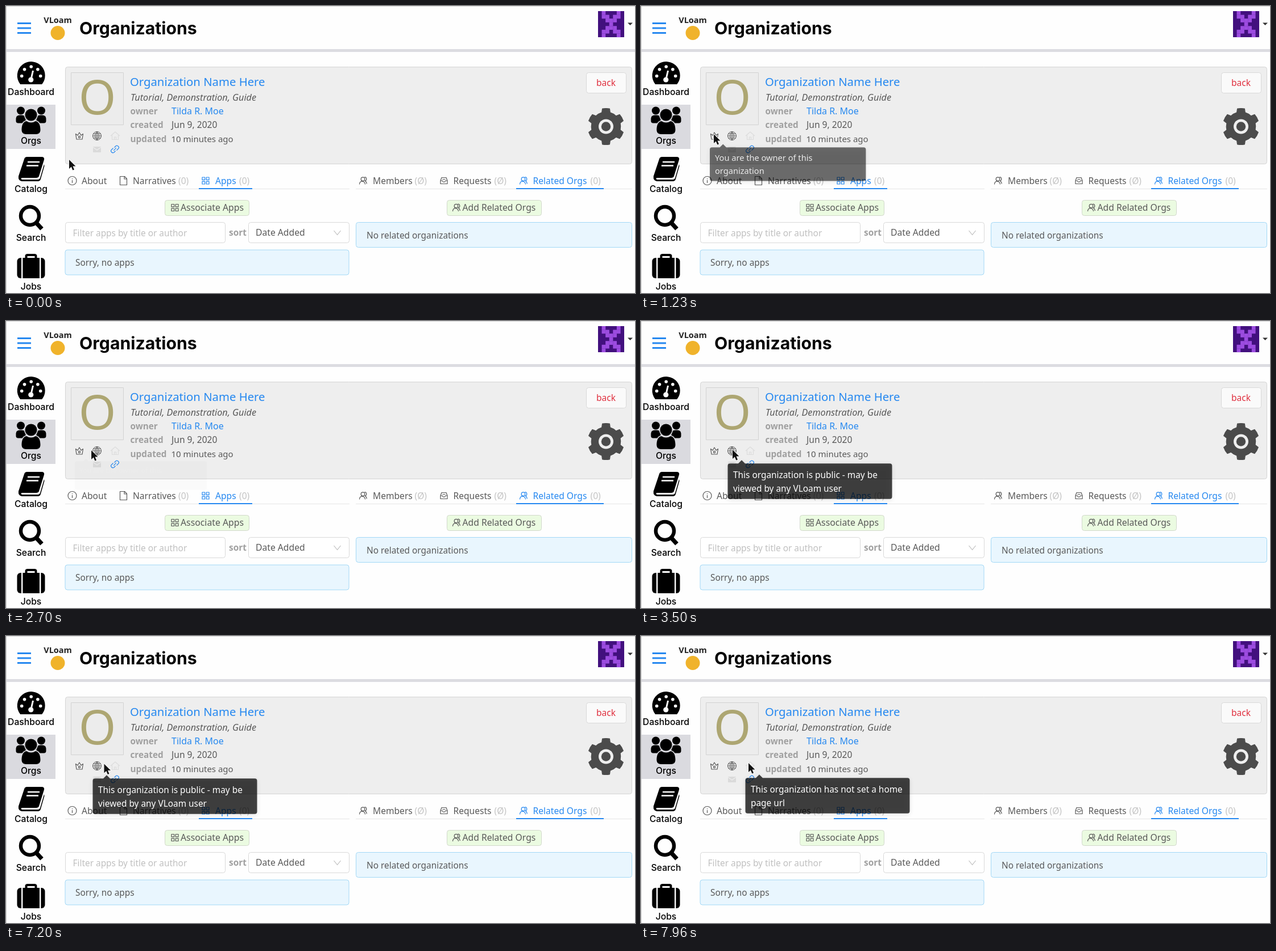
These frames come from a looping animation (1106x506 px, 8000 ms). An HTML page with a canvas:

```html
<!DOCTYPE html>
<html lang="en">
<head>
<meta charset="utf-8">
<title>Organizations</title>
<style>
html, body { margin: 0; width: 100%; height: 100%; overflow: hidden; background: #fefefe; }
canvas { display: block; }
</style>
</head>
<body>
<canvas id="stage" width="1106" height="506"></canvas>
<script>
const ctx = document.getElementById('stage').getContext('2d');
const LOOP = 8000;
const BLUE = '#2588f0', INK = '#595959', PALE = '#c4c4c4', PANEL = '#eeeeee', PAGE = '#fefefe';
const SANS = '"Noto Sans", sans-serif', UI = 'Inter, sans-serif';

function text(str, x, y, size, color = INK, style = '400', family = SANS, align = 'left') {
  ctx.font = `${style} ${size}px ${family}`;
  ctx.fillStyle = color;
  ctx.textAlign = align;
  ctx.fillText(str, x, y);
}

function rect(x, y, w, h, color) {
  ctx.fillStyle = color;
  ctx.fillRect(x, y, w, h);
}

function box(x, y, w, h, fill, border, radius = 4) {
  ctx.beginPath();
  ctx.roundRect(x + .5, y + .5, w - 1, h - 1, radius);
  ctx.fillStyle = fill;
  ctx.fill();
  ctx.strokeStyle = border;
  ctx.lineWidth = 1;
  ctx.stroke();
}

function disc(x, y, r, color) {
  ctx.beginPath();
  ctx.arc(x, y, r, 0, 7);
  ctx.fillStyle = color;
  ctx.fill();
}

function line(path, color, width = 1.2) {
  ctx.strokeStyle = color;
  ctx.lineWidth = width;
  ctx.stroke(new Path2D(path));
}

function shape(path, color) {
  ctx.fillStyle = color;
  ctx.fill(new Path2D(path));
}

function at(x, y, draw) {
  ctx.save();
  ctx.translate(x, y);
  draw();
  ctx.restore();
}

// Small outline icons, centred on the local origin
const icons = {
  info: 'M7.5 0A7.5 7.5 0 1 1 -7.5 0A7.5 7.5 0 1 1 7.5 0ZM0 -1V4M0 -4V-2.8',
  file: 'M-6 -7.5H2L6 -3.5V7.5H-6ZM1.5 -7.5V-3H6',
  apps: 'M-6 -6H-1.3V-1.3H-6ZM1.3 -6H6V-1.3H1.3ZM-6 1.3H-1.3V6H-6ZM1.3 1.3H6V6H1.3Z',
  people: 'M-3.8 -2.8A3.3 3.3 0 1 1 2.8 -2.8A3.3 3.3 0 1 1 -3.8 -2.8M-6.5 6.5C-6.2 -1 2.6 -.5 3.6 6.5' +
    'M2.5 -6.3A3.3 3.3 0 0 1 3.3 .2Q6 1.8 6.3 5.5',
  inbox: 'M-6 0L-4 -5.5H4L6 0V5.5H-6ZM-6 0H-2.5Q-2 2.5 0 2.5T2.5 0H6M-2.5 -2.5H2.5',
  crown: 'M-5 6H5L6.5 -3.5L3 -1L0 -6L-3 -1L-6.5 -3.5ZM1.6 2A1.6 1.6 0 1 1 -1.6 2A1.6 1.6 0 1 1 1.6 2',
  globe: 'M7.5 0A7.5 7.5 0 1 1 -7.5 0A7.5 7.5 0 1 1 7.5 0ZM0 -7.5V7.5M-7.5 0H7.5M-6.4 -3.8H6.4M-6.4 3.8H6.4' +
    'M0 -7.5Q-7 0 0 7.5Q7 0 0 -7.5',
  home: 'M-8 0L0 -7L8 0M-5.5 -1V6.5H5.5V-1M-1.5 6.5V2H1.5V6.5',
  link: 'M-1 -3L2 -6Q4 -7 6 -5T6 -1L3 2M1 3L-2 6Q-4 7 -6 5T-6 1L-3 -2M-2.3 2.3L2.3 -2.3',
  chevron: 'M-6 -3.5L0 4L6 -3.5'
};

function icon(name, x, y, color = INK, width = 1.2) {
  at(x, y, () => line(icons[name], color, width));
}

function header() {
  rect(0, 0, 1106, 1, '#d6d6d6');
  rect(0, 0, 1, 506, '#d0d0d0');
  rect(1, 76, 1105, 5, '#dcdce1');
  for (const y of [29, 37.5, 46]) rect(20, y, 24, 3, BLUE);
  text('VLoam', 91, 30, 14.5, '#222', '600', SANS, 'center');
  disc(91, 47.5, 12.5, '#f0b32b');
  text('Organizations', 129, 49.5, 30.2, '#050505', '700', UI);

  rect(1041, 9, 46, 46, '#42107e');
  ['0100010', '0110110', '0011100', '0001000', '0011100', '0110110', '0100010'].forEach((row, j) =>
    [...row].forEach((on, i) => on > 0 && rect(1041 + i * 46 / 7, 9 + j * 46 / 7, 6.7, 6.7, '#9c4ce0')));
  shape('M1093 29.5H1102L1097.5 34Z', '#333');
}

function dashboardIcon() {
  ctx.beginPath();
  ctx.arc(44.2, 122.5, 24.5, Math.PI - .68, .68);
  ctx.closePath();
  ctx.fillStyle = '#000';
  ctx.fill();
  for (let i = 0; i < 5; i++) {
    const a = Math.PI * (1 + i / 4);
    disc(44.2 + 16.5 * Math.cos(a), 123.5 + 16.5 * Math.sin(a), 2.8, PAGE);
  }
  disc(43.8, 130, 4.6, PAGE);
  line('M43.8 130L47.5 114', PAGE, 3);
}

function usersIcon(bg) {
  for (const side of [-1, 1]) {
    at(44 + side * 18, 0, () => {
      disc(0, 184.5, 7, '#000');
      ctx.beginPath();
      ctx.roundRect(-8.5, 192.5, 17, 14, [6, 6, 4, 4]);
      ctx.fill();
    });
  }
  const body = 'M36 203C30 204 27.5 210 27.5 219Q28 226 35 226H53Q60 226 60.5 219C60.5 210 58 204 52 203Q44 208 36 203Z';
  line(body, bg, 3);
  disc(44, 192, 12, bg);
  shape(body, '#000');
  disc(44, 192, 10.5, '#000');
}

function bookIcon() {
  shape('M37 266H64Q68 267 67 271L58 300Q57 303 53 303H28Q25 304 28 306H56Q59 306 60 303L67 279' +
    'Q68 282 67 284L61 305Q60 309 56 309H28Q21 308 22 300L32 270Q33 266 37 266Z', '#000');
  line('M38 275H59M36 281.5H57', PAGE, 2.4);
}

function suitcaseIcon() {
  ctx.beginPath();
  ctx.roundRect(19.5, 444, 49, 36, 6);
  ctx.fillStyle = '#000';
  ctx.fill();
  line('M35.5 445V441Q35.5 439 38 439H50Q52.5 439 52.5 441V445', '#000', 4);
  rect(27, 444, 2.4, 36, PAGE);
  rect(59, 444, 2.4, 36, PAGE);
}

function sidebar() {
  const selected = '#dadadf';
  rect(1, 174, 86, 78, selected);
  dashboardIcon();
  usersIcon(selected);
  bookIcon();
  line('M58 370A16 16 0 1 1 26 370A16 16 0 1 1 58 370', '#000', 6.5);
  line('M53 382L63 393', '#000', 7.5);
  suitcaseIcon();
  ['Dashboard', 'Orgs', 'Catalog', 'Search', 'Jobs'].forEach((label, i) =>
    text(label, 44, 157 + i * 85.7, 15.7, '#000', '500', UI, 'center'));
}

function gear(x, y) {
  at(x, y, () => {
    ctx.beginPath();
    for (let i = 0; i < 6; i++) {
      const a = i * Math.PI / 3 - Math.PI / 2;
      ctx.arc(0, 0, 25.7, a - .76, a - .29);
      ctx.arc(0, 0, 32, a - .2, a + .2);
    }
    ctx.closePath();
    ctx.fillStyle = ctx.strokeStyle = '#4b4b4b';
    ctx.lineWidth = 1.2;
    ctx.fill();
    ctx.stroke();
    disc(0, 0, 13, PANEL);
    disc(0, 0, 8.2, '#4b4b4b');
  });
}

function orgPanel() {
  box(104, 107, 997, 172, PANEL, '#d4d4d4');
  box(114, 117, 93, 93, '#ececec', '#d2d2d2', 0);
  text('O', 160.5, 191, 84, '#ada672', '400', SANS, 'center');

  icon('crown', 129, 229);
  icon('globe', 160, 229, INK, 1);
  icon('home', 192, 229, '#dcdcdc');
  rect(153, 248, 14, 10, '#dadada');
  line('M153 249L160 254L167 249', PANEL);
  icon('link', 191.5, 252.5, BLUE);

  text('Organization Name Here', 218, 141, 20.3, BLUE, '500');
  text('Tutorial, Demonstration, Guide', 219, 167, 16.2, INK, 'italic 400');
  ['owner', 'created', 'updated'].forEach((label, i) =>
    text(label, 218.5, 191 + i * 24.3, 15.3, '#a0a0a0', '600'));
  text('Tilda R. Moe', 291, 191, 16, BLUE);
  text('Jun 9, 2020', 291, 215.3, 15.6);
  text('10 minutes ago', 290.5, 239.6, 15);

  box(1020, 117, 71, 37, '#fafafa', '#d9d9d9');
  text('back', 1055, 141, 15.5, '#e0303f', '400', SANS, 'center');
  gear(1055, 212.5);
}

function tab(iconName, iconX, label, x, count, countX, active) {
  const color = active ? BLUE : INK;
  icon(iconName, iconX, 308, color);
  text(label, x, 314, 15.6, color);
  if (count) text(`(${count})`, countX, 314, 15.6, PALE);
}

function lists() {
  rect(104, 322, 500, 1, '#e6e6e6');
  rect(615, 322, 486, 1, '#e6e6e6');
  rect(339, 321, 94, 2, BLUE);
  rect(897, 321, 154, 2, BLUE);
  tab('info', 116.5, 'About', 133);
  tab('file', 206.5, 'Narratives', 223, '0', 303);
  tab('apps', 351, 'Apps', 368, '0', 410, true);
  tab('people', 628, 'Members', 645, 'Ø', 718.5);
  tab('inbox', 770, 'Requests', 786.5, 'Ø', 858.5);
  tab('people', 910, 'Related Orgs', 926.5, '0', 1027.5, true);

  box(279, 342, 149, 28, '#ebfbe1', '#d2d8cc');
  icon('apps', 297, 355.5);
  text('Associate Apps', 307, 361, 15.8);
  box(775, 342, 167, 28, '#ebfbe1', '#d2d8cc');
  icon('people', 792, 355.5);
  text('Add Related Orgs', 802.5, 361, 15.7);

  box(104, 381, 282, 37, '#fff', '#d9d9d9');
  text('Filter apps by title or author', 117.5, 406, 15.4, '#c0c0c0');
  text('sort', 392, 405, 15.4, '#a0a0a0', '600');
  box(426, 381, 178, 37, '#fff', '#d9d9d9');
  text('Date Added', 439, 405, 15.7);
  icon('chevron', 582.5, 399.5, '#bcbcbc');

  box(103.5, 429.5, 500, 45, '#e9f6fe', '#a2d8f6');
  text('Sorry, no apps', 122, 458, 15.4);
  box(615, 381, 486, 45, '#e9f6fe', '#a2d8f6');
  text('No related organizations', 634, 409.5, 15.4);
}

const tooltips = [
  { x: 121, y: 249.9, from: 1230, to: 2600, lines: ['You are the owner of this', 'organization'] },
  { x: 152.5, y: 251.3, from: 3260, to: 7240, lines: ['This organization is public - may be', 'viewed by any VLoam user'] },
  { x: 183.5, y: 250.3, from: 7700, to: 9000, lines: ['This organization has not set a home', 'page url'] }
];

function presence(tip, t) {
  if (t < tip.from) return 0;
  if (t < tip.to) return 1 - .26 * Math.exp(-(t - tip.from) / 35);
  const k = Math.min(1, (t - tip.to) / 110);
  return 1 - k * k * (3 - 2 * k);
}

function tooltip(tip, t) {
  const p = presence(tip, t), originY = 236;
  if (p <= 0) return;
  at(tip.x, originY, () => {
    const scale = .8 + .2 * p, top = tip.y - originY;
    ctx.scale(scale, scale);
    ctx.globalAlpha = p;
    ctx.save();
    ctx.shadowColor = 'rgba(0,0,0,.14)';
    ctx.shadowBlur = 8;
    ctx.shadowOffsetY = 2;
    ctx.beginPath();
    ctx.roundRect(0, top, 289, 62.5, 4);
    ctx.moveTo(18.5, top);
    ctx.lineTo(24.5, top - 6);
    ctx.lineTo(30.5, top);
    ctx.fillStyle = 'rgba(0,0,0,.73)';
    ctx.fill();
    ctx.restore();
    ctx.globalAlpha = Math.sqrt(p);
    tip.lines.forEach((str, i) => text(str, 9.5, top + 25.3 + i * 24.3, 15.4, '#fff'));
  });
}

// Pointer tip positions: time, x, y
const pointerPath = [
  [0, 111, 271], [100, 111, 271], [930, 128, 226], [2330, 128, 226], [2700, 150, 228], [2860, 160, 227],
  [3230, 160, 227], [3500, 161, 227], [6800, 161, 227], [6830, 163, 226], [6960, 169, 226],
  [7100, 169, 226], [7560, 185, 224], [7700, 185, 224], [7960, 189, 224], [LOOP, 189, 224]
];

function pointer(t) {
  const i = pointerPath.findIndex(p => p[0] > t);
  const [t0, x0, y0] = pointerPath[i - 1], [t1, x1, y1] = pointerPath[i];
  const linear = (t - t0) / (t1 - t0);
  const k = t1 - t0 > 500 ? linear * linear * (3 - 2 * linear) : linear;
  at(x0 + (x1 - x0) * k, y0 + (y1 - y0) * k, () => {
    const arrow = 'M0 0V16L3.8 12.5L6.3 18.5L9 17.4L6.5 11.5H11.5Z';
    line(arrow, 'rgba(255,255,255,.85)', 1.8);
    shape(arrow, '#111');
  });
}

function draw(now) {
  const t = now % LOOP;
  rect(0, 0, 1106, 506, PAGE);
  header();
  sidebar();
  orgPanel();
  lists();
  tooltips.forEach(tip => tooltip(tip, t));
  pointer(t);
}

ctx.lineJoin = 'round';
const start = performance.now();
function tick() {
  draw(performance.now() - start);
  requestAnimationFrame(tick);
}
tick();
</script>
</body>
</html>
```
